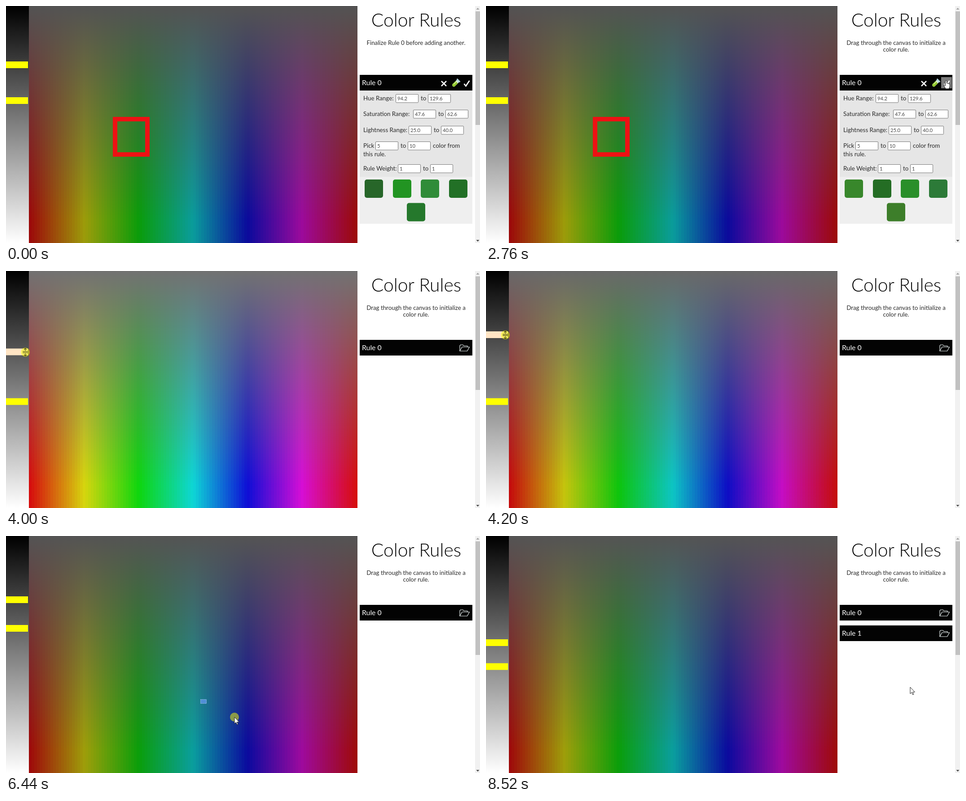
An HTML page for the animation above (8600 ms loop, 1056 px wide and 530 px high).

```html
<!DOCTYPE html>
<html lang="en">
<head>
<meta charset="utf-8">
<title>Color Rules</title>
<style>
html, body { margin: 0; width: 100%; height: 100%; overflow: hidden; background: #fff; }
#field { position: absolute; left: 51px; top: 0; width: 732px; height: 530px; }
svg { position: absolute; left: 0; top: 0; }
text { font-family: Lato, "Open Sans", sans-serif; font-weight: 400; font-size: 13.35px; fill: #2a2a2a; }
.mid { text-anchor: middle; }
.title { font-size: 40.8px; font-weight: 300; fill: #000; }
.head { font-size: 15.8px; fill: #fff; }
.num { font-size: 11.2px; fill: #444; }
</style>
</head>
<body>
<div id="field"></div>
<svg id="stage" width="1056" height="530" viewBox="0 0 1056 530">
  <defs>
    <linearGradient id="light" x2="0" y2="1"><stop stop-color="#000"/><stop offset="1" stop-color="#fff"/></linearGradient>
    <g id="folder" fill="none" stroke="#e8f0f0" stroke-width="1.2" stroke-linejoin="round">
      <path d="M1 15V3L3 1H8L10 3.5H18V6"/><path d="M1 15L6 6H22.5L17.5 15Z"/>
    </g>
    <g id="tube" transform="rotate(45)">
      <path d="M-3.6-8V6a3.6 3.6 0 0 0 7.2 0V-8Z" fill="#cfe6ea"/>
      <path d="M-3.6-3V6a3.6 3.6 0 0 0 7.2 0V-3Z" fill="#8fc52b"/>
      <rect x="-5" y="-10" width="10" height="3" rx="1" fill="#a9c9d2"/>
      <path d="M-1.5-6V5" stroke="#e2f5a8" stroke-width="1.4"/>
    </g>
  </defs>
  <rect width="51" height="530" fill="url(#light)"/>
  <rect class="handle" width="49" height="15"/>
  <rect class="handle" width="49" height="15"/>
  <rect id="seed" x="433.5" y="365.5" width="13" height="9" fill="#4f8fd6" stroke="#a9c8ee" stroke-dasharray="1.5 1"/>
  <rect id="pick" fill="none" stroke="#ee1114" stroke-width="10"/>
  <rect x="783" width="273" height="530" fill="#fff"/>
  <text class="title mid" x="914" y="46">Color Rules</text>
  <text class="mid" id="msg" x="913.5" y="87"></text>
  <text class="mid" id="msg2" x="913.5" y="102"></text>
  <g id="rules"></g>
  <rect x="1045" width="11" height="530" fill="#f1f1f1"/>
  <rect x="1046" y="12" width="10" height="254" fill="#c1c1c1"/>
  <path d="M1047.5 8L1051 4L1054.5 8Z" fill="#a3a3a3"/>
  <path d="M1047.5 523L1051 527L1054.5 523Z" fill="#505050"/>
  <g id="cursor">
    <circle id="press" r="10" fill="#ff0" opacity=".5"/>
    <path id="arrow" d="M0 0V14.8L3.4 11.7L5.8 17L7.9 16.1L5.6 11H10.4Z" fill="#fff" stroke="#222"/>
    <path id="hand" transform="translate(0 -1) scale(.95)" d="M-1.7 1Q0-1.5 1.7 1V6L6.5 7Q9 7.6 8.7 10V13.5L6.8 19H-1L-5 12Q-5.6 9.6-3.4 10L-1.7 12Z" fill="#fff" stroke="#111"/>
    <path id="resize" d="M-6-1.5H6M-6 1.5H6M0-3V-8M-3-5.5L0-8.5L3-5.5M0 3V8M-3 5.5L0 8.5L3 5.5" stroke="#4d4d18" stroke-width="1.3" fill="none"/>
  </g>
</svg>
<script>
const LOOP = 8600, H = 530;
const $ = id => document.getElementById(id);
const show = (el, on) => el.setAttribute('visibility', on ? 'inherit' : 'hidden');
const set = (el, attrs) => { for (const k in attrs) el.setAttribute(k, attrs[k]); };
const within = (t, a, b) => t >= a && t < b;

const label = (x, y, s) => `<text x="${x}" y="${y}">${s}</text>`;
const input = (x, y, s) =>
  `<rect x="${x + .5}" y="${y + .5}" width="50" height="18.5" rx="1.5" fill="#fff" stroke="#777"/>
   <text class="num" x="${x + 4}" y="${y + 14}">${s}</text>`;

function row(y, name, x, lo, hi) {
  return label(796, y + 14, name) + input(x, y, lo) + label(x + 56, y + 14, 'to') + input(x + 72, y, hi);
}

// All positions are written for the first rule and shifted down for later ones.
function rule(n, v, swatches) {
  const cells = Array.from({ length: swatches }, (_, i) =>
    `<rect class="swatch" x="${i < 4 ? 799 + Math.round(i * 62.7) : 893}" y="${i < 4 ? 388 : 440.5}"
      width="41" height="41" rx="5"/>`).join('');
  return `<g id="rule${n}" transform="translate(0 ${n * 46})">
    <rect x="788" y="154" width="251" height="35" fill="#030303"/>
    <rect class="hover" y="159" width="24" height="25" fill="#7b7b7b"/>
    <text class="head" x="793" y="177">Rule ${n}</text>
    <use class="shut" href="#folder" x="1010" y="164"/>
    <g class="open">
      <path d="M970 168L981 179M981 168L970 179" stroke="#fff" stroke-width="2.6"/>
      <use href="#tube" transform="translate(1002 172.5)"/>
      <path d="M1020.5 174L1024.5 179L1032.5 167" stroke="#fff" stroke-width="2.8" fill="none"/>
      <rect x="788" y="189" width="251" height="193" fill="#e6e6e6"/>
      ${swatches ? '<rect x="788" y="382" width="251" height="105" fill="#efefef"/>' : ''}
      ${row(197, 'Hue Range:', 868, v[0], v[1])}
      ${row(232, 'Saturation Range:', 907, v[2], v[3])}
      ${row(268, 'Lightness Range:', 897, v[4], v[5])}
      ${row(303, 'Pick', 823, 5, 10)}
      ${label(951, 317, 'color from')}${label(796, 336, 'this rule.')}
      ${row(354, 'Rule Weight:', 873, 1, 1)}
      ${cells}
    </g></g>`;
}

$('rules').innerHTML =
  rule(0, ['94.2', '129.6', '47.6', '62.6', '25.0', '40.0'], 5) +
  rule(1, ['188.9', '255.2', '69.8', '91.5', '26.9', '39.1'], 0);

const handles = document.querySelectorAll('.handle');
const swatches = document.querySelectorAll('.swatch');
const before = ['#276629', '#229422', '#308c38', '#227026', '#25782c'];
const after = ['#38872b', '#246d24', '#2a8f2a', '#2c7a38', '#3d7e2a'];

// [time, x, y]
const path = [
  [80, 1052, 14], [460, 1002, 172], [600, 1002, 172], [800, 1025, 168], [1480, 1025, 168],
  [1800, 985, 235], [2160, 1025, 168], [3100, 1025, 168], [3440, 246, 200], [3680, 43, 239],
  [3760, 43, 239], [4160, 43, 143], [4240, 43, 143], [4520, 28, 292], [4680, 27, 292],
  [5000, 26, 227], [5120, 26, 207], [5320, 26, 207], [5720, 231, 385], [6120, 435, 370],
  [6160, 435, 370], [6440, 509, 405], [6640, 560, 466], [6720, 570, 484], [6800, 572, 485],
  [7440, 1025, 215], [8440, 1025, 215], [8520, 945, 338]
];
const upper = [[3760, 238.5], [4160, 142.5]];
const lower = [[4760, 292], [5000, 271], [5240, 206.5]];
const presses = [[500, 580], [1320, 1400], [2240, 2320], [2840, 2920], [3760, 4240],
  [4600, 5320], [6160, 6720], [7600, 7680]];

function at(keys, t, k = 1) {
  if (t <= keys[0][0]) return keys[0][k];
  for (let i = 1; i < keys.length; i++) {
    const a = keys[i - 1], b = keys[i];
    if (t <= b[0]) return a[k] + (b[k] - a[k]) * (t - a[0]) / (b[0] - a[0]);
  }
  return keys[keys.length - 1][k];
}

// Pure hues under a grey veil that thins out downwards, down to a saturation of 88%.
let shade = -1;
function paintField(l) {
  if (l === shade) return;
  shade = l;
  const n = 122, stops = [];
  for (let i = 0; i < n; i++)
    stops.push(`hsl(${i * 360 / (n - 1)},100%,${l}%) ${i * 6}px ${i * 6 + 6}px`);
  $('field').style.background =
    `linear-gradient(hsla(0,0%,${l}%,1),hsla(0,0%,${l}%,.12) 90%),linear-gradient(90deg,${stops})`;
}

function drawRule(n, open, x, y) {
  const g = $('rule' + n), hover = g.querySelector('.hover');
  show(g.querySelector('.open'), open);
  show(g.querySelector('.shut'), !open);
  const slots = open ? [963, 990, 1014] : [1009];
  const slot = within(y - n * 46, 159, 184) ? slots.find(s => within(x, s, s + 24)) : undefined;
  show(hover, slot !== undefined);
  if (slot !== undefined) set(hover, { x: slot });
  return slot !== undefined;
}

function draw(t) {
  const open0 = t < 1360 || within(t, 2280, 2880);
  const open1 = within(t, 6720, 7640);
  const done = t >= 7640;
  const x = t < 80 ? -50 : at(path, t), y = at(path, t, 2);

  const a = open0 ? 131.5 : done ? 238.5 : at(upper, t);
  const b = open0 ? 211.5 : done ? 292 : at(lower, t);
  paintField(t < 3760 ? 32.5 : done ? 33 : +((a + b) / 2 / H * 100).toFixed(2));
  set(handles[0], { y: a - 7.5, fill: within(t, 3760, 4240) ? '#ffe4c4' : '#ff0' });
  set(handles[1], { y: b - 7.5, fill: within(t, 4600, 5320) ? '#ffe4c4' : '#ff0' });

  show($('seed'), within(t, 6160, 6720));
  show($('pick'), open0 || open1);
  set($('pick'), open1 ? { x: 435, y: 370, width: 135, height: 115 }
                       : { x: 243, y: 253, width: 72, height: 79 });

  const active = t < 1360 ? 0 : open1 ? 1 : -1;
  $('msg').textContent = active < 0 ? 'Drag through the canvas to initialize a'
                                    : `Finalize Rule ${active} before adding another.`;
  $('msg2').textContent = active < 0 ? 'color rule.' : '';

  swatches.forEach((s, i) => set(s, { fill: (t < 540 ? before : after)[i] }));
  const over0 = drawRule(0, open0, x, y);
  const over1 = drawRule(1, open1, x, y) && t >= 6720;
  $('rule1').style.display = t >= 6720 ? '' : 'none';

  const over = over0 || over1;
  const grip = x < 50 && (Math.abs(y - a) < 8 || Math.abs(y - b) < 8);
  set($('cursor'), { transform: `translate(${x} ${y})` });
  show($('cursor'), t >= 80);
  show($('press'), presses.some(p => within(t, p[0], p[1])));
  show($('hand'), over);
  show($('resize'), grip && !over);
  show($('arrow'), !grip && !over);
}

const start = performance.now();
function tick() {
  const t = Math.max(0, performance.now() - start) % LOOP;
  draw(Math.floor(t / 40) * 40);
  requestAnimationFrame(tick);
}
tick();
</script>
</body>
</html>
```
